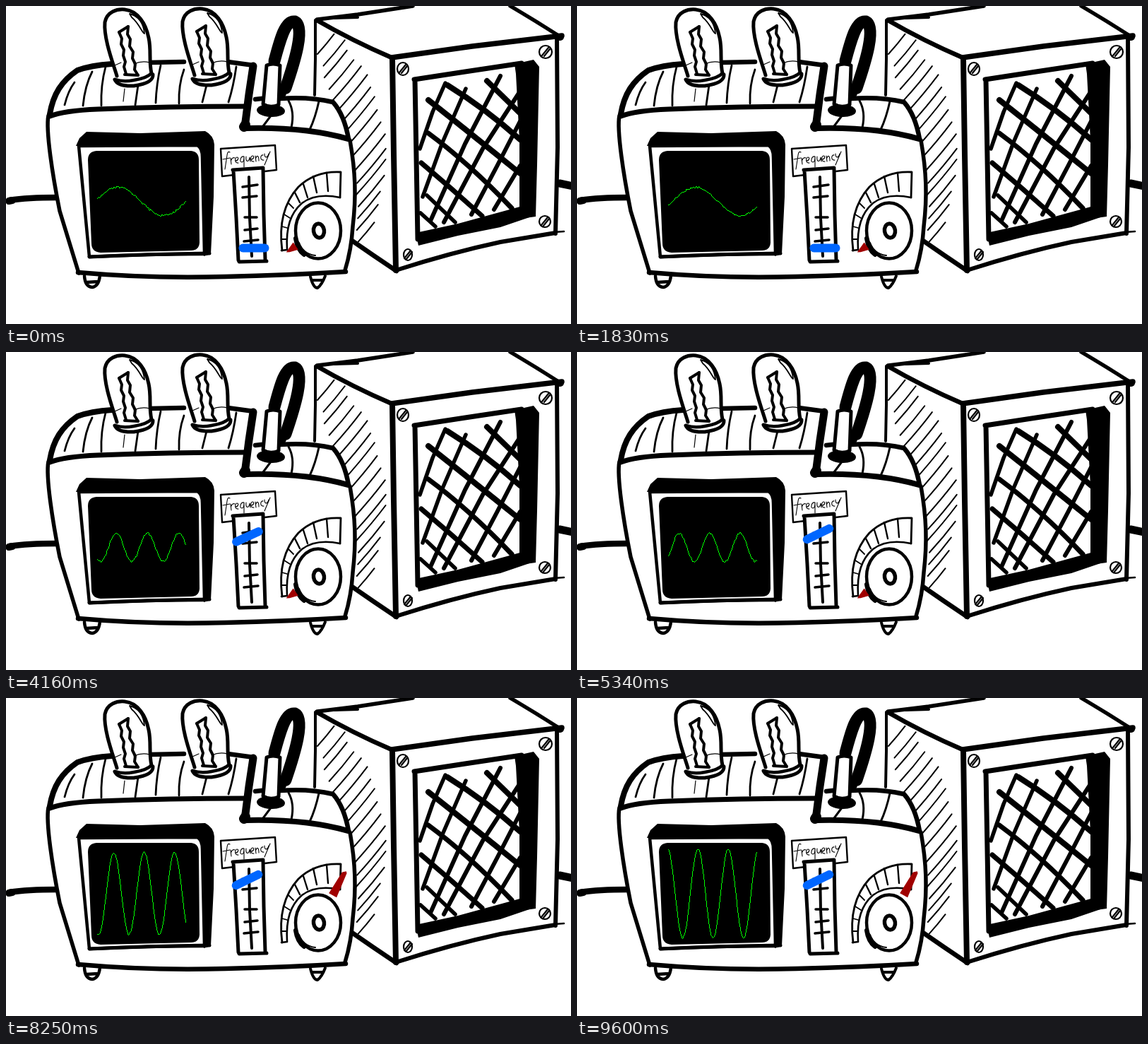
Recreate the animation shown at these times as an HTML page with a canvas. Size 800 by 450 pixels, loop 9630 ms.

```html
<!DOCTYPE html>
<html lang="en">
<head>
<meta charset="utf-8">
<title>Frequency and amplitude</title>
<style>
html, body { margin: 0; width: 100%; height: 100%; overflow: hidden; background: #fff; }
canvas { display: block; width: 100vw; height: 100vh; }
</style>
</head>
<body>
<canvas id="stage" width="800" height="450" role="img" aria-label="Oscilloscope with a slider labelled frequency, a dial and a loudspeaker"></canvas>
<script>
const LOOP = 9630;
const stage = document.getElementById('stage');
const view = stage.getContext('2d');
const art = document.createElement('canvas');
art.width = 800;
art.height = 450;
const c = art.getContext('2d');

const lerp = (a, b, u) => a + (b - a) * u;
const noise = n => {
  const s = Math.sin(n * 12.9898) * 43758.5453;
  return s - Math.floor(s);
};

function ink(width, d) {
  c.lineWidth = width;
  c.stroke(new Path2D(d));
}

function fill(d, color = '#000') {
  c.fillStyle = color;
  c.fill(new Path2D(d));
}

function oval(x, y, rx, ry, width, tilt = 0) {
  c.beginPath();
  c.ellipse(x, y, rx, ry, tilt, 0, Math.PI * 2);
  c.lineWidth = width;
  c.stroke();
}

function hatching() {
  for (let i = 0; i < 17; i++) {
    const x = 441 + Math.min(54, i * 4.8) + noise(i) * 4;
    const y = 68 + i * 16.6;
    const w = 20 + 24 * Math.sin(i / 16 * Math.PI) + noise(i + 40) * 6;
    ink(2, `M${x} ${y}Q${x + w * 0.55} ${y - w * 0.6} ${x + w} ${y - w * 1.2}`);
  }
}

function screw(x, y, rx, ry) {
  oval(x, y, rx, ry, 2.2);
  ink(2.2, `M${x - 5} ${y + 5}L${x + 4} ${y - 6}M${x - 2} ${y + 6}L${x + 6} ${y - 4}`);
}

function speaker() {
  hatching();
  ink(4, 'M438 20L438 75L437 126');
  ink(6.5, 'M440 20Q490 49 546 73M487 330Q520 353 553 375');
  ink(5.5, 'M441 19L498 12L576 0M714 0Q748 20 784 43');
  ink(4, 'M465 17L498 16');
  ink(7.5, 'M546 73L660 57L787 42');
  ink(8, 'M547 75L549 210L552 374');
  ink(6, 'M780 44L781 200L778 322M552 374Q630 349 700 334L778 321');
  ink(2.5, 'M776 320L790 319');
  ink(10, 'M783 44L785 44');
  ink(7, 'M579 104L581 215L583 330M578 104L650 93L730 81');
  fill('M720 82L747 76L755 86L752 225L750 298L735 300L727 288L727 190L722 96Z');
  fill('M580 321L640 308L735 282L750 296L700 313L640 325L584 339Z');
  mesh();
  screw(562, 89, 8, 9);
  screw(764, 65, 9, 9);
  screw(763, 305, 8, 8);
  screw(569, 352, 6, 8);
}

function mesh() {
  ink(8, 'M681 106L727 151M625 112Q680 146 728 189M598 133Q660 182 728 237');
  ink(7, 'M598 180Q655 222 716 286M588 222L630 258L674 297');
  ink(5.5, 'M596 268L636 306M587 293L608 312');
  ink(5.5, 'M622 109L604 150L586 202M651 117L618 193L590 270');
  ink(6, 'M700 99L650 195L601 304M727 122L675 202L620 306');
  ink(6, 'M728 163L695 227L659 295M728 226L691 288');
}

function bulb(x, y) {
  c.save();
  c.translate(x, y);
  const glass = 'M157 99C152 82 138 46 140 23C143 8 157 4 168 5C187 7 198 25 202 45C206 63 202 78 206 95';
  fill(glass + 'L182 114Z', '#fff');
  ink(5, glass);
  ink(5, 'M154 104Q158 114 181 113Q209 109 208 97');
  ink(4.5, 'M155 104Q166 108 181 105Q200 102 206 95');
  ink(4, 'M160 37L164 46L163 54L167 62L166 70L169 79L167 86L170 96');
  ink(4, 'M173 29L172 40L176 47L175 57L180 65L179 74L183 82L182 90L187 98');
  ink(4, 'M160 37L173 29M168 97L187 98');
  ink(1.8, 'M175 11C188 14 195 25 196 39C193 39 189 25 178 16Z');
  ink(1.2, 'M154 84L163 80M181 82Q193 77 203 80');
  c.restore();
}

function body() {
  ink(8.5, 'M5 275Q30 271 72 271');
  ink(10, 'M4 276L9 275');
  ink(11, 'M784 251L803 255');
  fill('M60 155Q65 122 100 91L150 81L352 82L350 132L463 135Q480 153 488 190Q502 280 481 375Q290 392 103 378Q58 250 60 155Z', '#fff');
  ink(5.5, 'M60 155C56 176 66 240 76 290L103 378M487 190C495 235 496 270 491 312Q489 345 480 374');
  ink(6.5, 'M102 377C170 383 240 385 310 383Q400 381 481 376');
  ink(7, 'M62 156Q82 148 130 146Q230 142 338 142');
  ink(8, 'M62 153C67 124 79 106 101 91Q120 84 150 82');
  ink(6.5, 'M204 80L252 79M314 79L351 84');
  ink(11, 'M350 85L344 125L338 172');
  ink(14, 'M337 171L339 168');
  ink(8, 'M340 173Q425 171 484 188');
  ink(6.5, 'M353 132L362 131M388 131Q430 128 463 136Q479 154 485 188');
  ink(2.8, 'M97 108Q88 120 83 140M122 93Q112 112 109 141M141 86Q134 112 135 141');
  ink(2.8, 'M187 112L183 140M219 84Q213 110 212 137M252 90Q244 112 245 138');
  ink(2.8, 'M284 112L278 136M326 86Q322 114 315 136');
  ink(1.2, 'M168 117L166 135');
  ink(3, 'M376 154L364 170M400 134Q409 150 404 172M443 135Q438 158 430 175');
  ink(4.5, 'M111 382Q112 397 122 398Q131 397 133 382M114 391L130 390');
  ink(4, 'M431 383Q435 399 441 399Q447 395 452 382M434 388L449 388');
}

function plug() {
  ink(17, 'M380 78C388 48 395 20 409 22C424 29 409 78 396 116');
  ink(9, 'M397 108L392 125');
  c.beginPath();
  c.ellipse(375, 148, 20, 9, 0.05, 0, Math.PI * 2);
  c.fillStyle = '#000';
  c.fill();
  const sleeve = 'M369 84Q378 80 388 84L386 140Q374 145 364 139Z';
  fill(sleeve, '#fff');
  ink(5, sleeve);
}

function screen() {
  fill('M99 198L104 187L114 178L190 180L282 177Q294 183 295 196L294 270L290 351L280 354L276 210L268 199Z');
  const frame = 'M103 198L271 197Q278 201 278 214L281 351Q200 351 118 355Z';
  fill(frame, '#fff');
  ink(4.5, frame);
  ink(5, 'M118 355Q200 351 288 350');
  fill('M128 205L262 205Q273 206 273 218L274 335Q273 346 262 346L134 349Q121 348 121 336L116 218Q116 206 128 205Z');
}

function lettering() {
  ink(1.1, 'M317 207C313 204 313 212 312 218L310 231M307 217L317 215');
  ink(1.1, 'M318 215l1 9M319 218c1 -3 3 -4 5 -3');
  const e = 'c4 0 5 -5 2 -5c-3 0 -4 9 2 8';
  ink(1.1, 'M325 219' + e + 'M347 217' + e);
  ink(1.1, 'M337 213c-5 -1 -7 8 -3 8c2 0 3 -4 3 -8l0 15');
  ink(1.1, 'M340 213c-1 8 4 9 5 1l1 6');
  ink(1.1, 'M353 212l1 8M354 215c1 -4 4 -4 4 4M364 211c-4 -1 -5 8 1 7');
  ink(1.1, 'M366 209c0 6 4 7 6 0M374 206l-8 19');
}

function slot() {
  const label = 'M304 202L381 197L383 232L306 241Z';
  fill(label, '#fff');
  ink(2.4, label);
  lettering();
  fill('M322 232L364 229L367 361L329 362Z', '#fff');
  ink(5, 'M321 232L364 229M322 233L326 300L329 360M364 230L365 295L367 359M330 362L369 361');
  ink(4, 'M344 242L345 300L348 354');
  ink(3.5, 'M335 256L356 253M335 271L355 269M338 299L355 299M338 317L356 315M337 333L357 331');
}

function dial() {
  ink(2.8, 'M391 346C386 308 394 278 414 256Q438 233 474 235L473 271');
  ink(2.6, 'M390 346L398 345C396 313 403 293 419 279Q439 264 473 271');
  ink(2.4, 'M454 236L456 262M435 241L440 264M421 252L427 271M409 264L416 278');
  ink(1.8, 'M400 279L407 286M394 295L402 300M391 312L398 314M390 330L397 330');
  oval(442, 318, 32, 39.5, 4.5);
  ink(6, 'M410 329Q412 344 422 352');
  ink(2, 'M415 335Q421 351 438 353');
  oval(443, 318, 7.5, 10, 5.5, -0.15);
}

function drawArt() {
  c.fillStyle = '#fff';
  c.fillRect(0, 0, 800, 450);
  c.strokeStyle = '#000';
  c.lineCap = c.lineJoin = 'round';
  speaker();
  body();
  bulb(0, 0);
  bulb(110, -1);
  plug();
  screen();
  slot();
  dial();
}

// The clock ticks every 30 ms, and every 100 ms while a control is moved.
function tick(t) {
  if (t < 3360) return Math.floor(t / 30);
  if (t < 4260) return 112 + Math.floor((t - 3360) / 100);
  if (t < 7500) return 121 + Math.floor((t - 4260) / 30);
  if (t < 8100) return 229 + Math.floor((t - 7500) / 100);
  return 235 + Math.max(0, Math.floor((t - 8100) / 30) - 2);
}

function sliderAt(n) {
  if (n < 112) return 0;
  if (n < 119) return (n - 111) / 7;
  return n === 119 ? 1.02 : n === 120 ? 0.955 : 1;
}

function needleAt(n) {
  if (n < 229) return 0;
  if (n < 234) return (n - 228) / 5;
  return n === 234 ? 1.06 : 1;
}

function phaseAt(n) {
  const low = 0.08 + 0.096 * Math.min(n, 112);
  if (n < 112) return low;
  if (n < 121) return lerp(low, 10.2, (n - 112) / 9);
  return 1.25 + 0.219 * (n - 195);
}

function drawWave(n, t) {
  const k = 0.0491 + 0.097 * sliderAt(n);
  const amp = lerp(20, 63, Math.min(1, Math.max(0, (t - 7500) / 850)));
  const phase = phaseAt(n);
  let last = null;
  view.fillStyle = '#0f0';
  for (let x = 129; x < 255; x++) {
    const jitter = (noise(n * 97 + (x >> 1)) - 0.5) * 2.4;
    const y = Math.round(276 - amp * Math.sin(k * (x - 128) + phase) + jitter);
    const from = last === null ? y : last + Math.sign(y - last);
    view.fillRect(x, Math.min(y, from), 1, Math.abs(y - from) + 1);
    last = y;
  }
}

function drawSlider(u) {
  const half = lerp(15.5, 17.5, u);
  view.save();
  view.translate(lerp(351, 341.5, u), lerp(342.5, 257.5, u));
  view.rotate(-0.45 * u);
  view.strokeStyle = '#06f';
  view.lineWidth = 12;
  view.lineCap = 'round';
  view.beginPath();
  view.moveTo(-half, 0);
  view.lineTo(half, 0);
  view.stroke();
  view.restore();
}

function drawNeedle(u) {
  const base = lerp(39, 43, u);
  const tip = lerp(55, 82, u);
  view.save();
  view.translate(442, 317);
  view.rotate(lerp(145, 299, u) * Math.PI / 180);
  view.fillStyle = '#a00000';
  view.beginPath();
  view.moveTo(base, -6.5);
  view.lineTo(tip - 4, -lerp(2.5, 4.5, u));
  view.lineTo(tip, 0);
  view.lineTo(tip - 2, lerp(1, 2, u));
  view.lineTo(base, 6);
  view.fill();
  view.restore();
}

function draw(now) {
  const t = now % LOOP;
  const n = tick(t);
  view.drawImage(art, 0, 0);
  drawWave(n, t);
  drawSlider(sliderAt(n));
  drawNeedle(needleAt(n));
}

let start = null;
function play(now) {
  if (start === null) start = now;
  draw(Math.max(0, now - start));
  requestAnimationFrame(play);
}

drawArt();
draw(0);
requestAnimationFrame(play);
</script>
</body>
</html>
```
